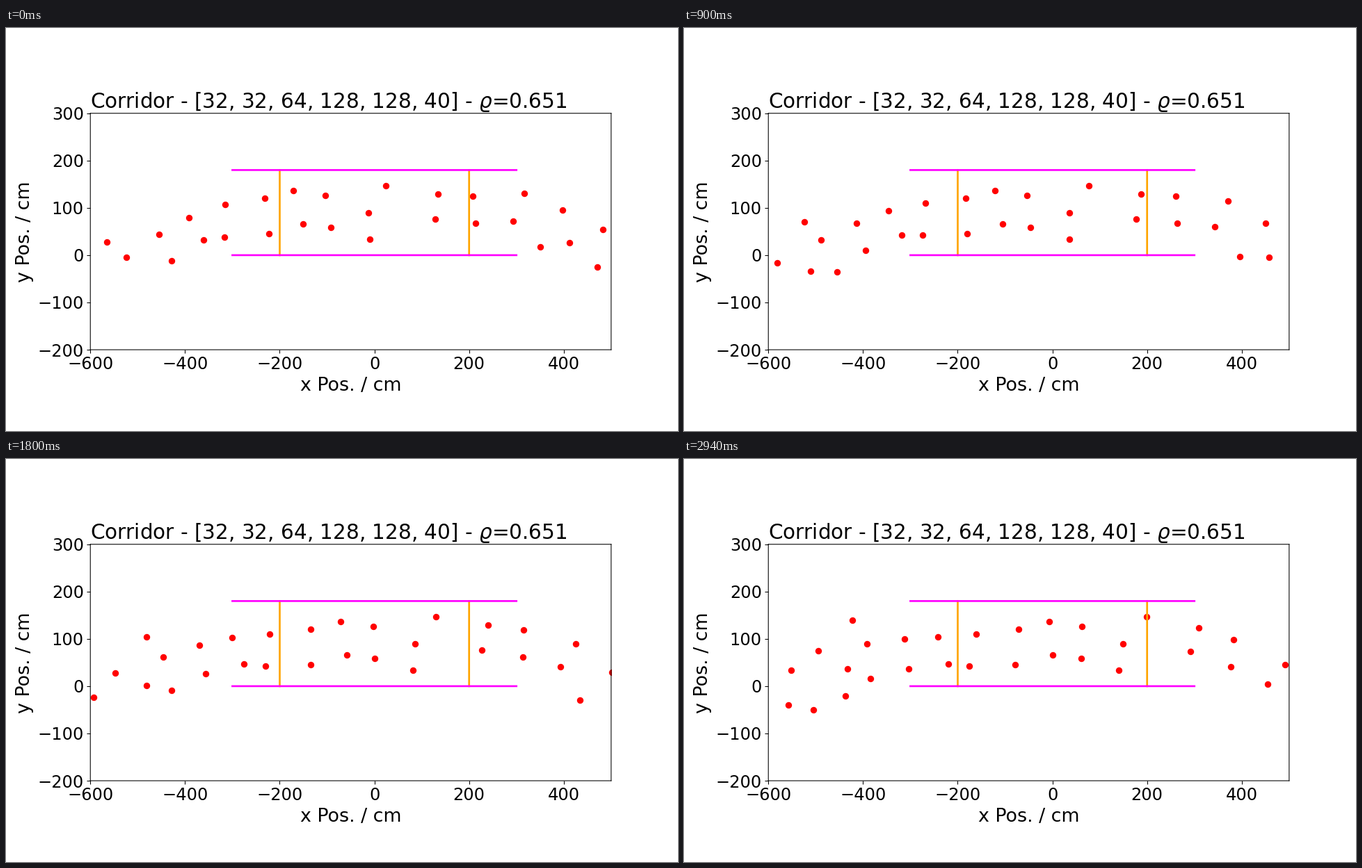
Write a matplotlib script that moves like this. It is 966 px wide and 580 px high and loops after 3 s.

```python
import matplotlib.pyplot as plt
import numpy as np
from matplotlib.animation import FuncAnimation

FRAMES, INTERVAL = 50, 60
MID = 26       # moment at which the crowd is placed
SCALE = 0.966  # text and line scale

plt.rcParams.update({
    "font.family": "DejaVu Sans",
    "path.snap": False,
    "axes.linewidth": 0.8 * SCALE,
    "axes.labelsize": 20 * SCALE,
    "axes.titlesize": 22 * SCALE,
    "axes.titlepad": 6 * SCALE,
    "axes.labelpad": 4 * SCALE,
})
for axis in ("xtick", "ytick"):
    plt.rcParams[axis + ".labelsize"] = 18 * SCALE
    plt.rcParams[axis + ".major.size"] = 3.5 * SCALE
    plt.rcParams[axis + ".major.pad"] = 3.5 * SCALE
    plt.rcParams[axis + ".major.width"] = 0.8 * SCALE

# pedestrians (x, y in cm) at mid-loop, from left to right
crowd = np.array([
    (-600, -37), (-577, -109), (-557, 16), (-523, -106), (-493, 96),
    (-490, -8), (-472, -63), (-458, 54), (-436, -16), (-381, 82),
    (-367, 22), (-313, 101), (-287, 46), (-242, 42), (-234, 110),
    (-147, 120), (-147, 45), (-85, 136), (-71, 66), (-16, 126),
    (-12, 59), (69, 33), (72, 90), (116, 147), (214, 76),
    (226, 129), (300, 121), (300, 64), (380, 47), (411, 97),
    (424, -22), (486, -32), (488, 40), (518, -97), (564, -25),
], float)


def velocity(pos):
    """Flow in cm per frame: up into the corridor, level inside, down after it."""
    x, y = pos.T
    vx = 2.89 + 0.0007 * x + 0.004 * y - 0.014 * np.maximum(25 - y, 0)
    vy = np.maximum(-270 - x, 0) / 100 - np.maximum(x - 250, 0) / 90
    return np.column_stack([vx, vy])


def drift(pos, steps, sign):
    """Positions after each step, forwards or backwards in time."""
    track = []
    for _ in range(steps):
        half = pos + sign * velocity(pos) / 2
        pos = pos + sign * velocity(half)
        track.append(pos)
    return track


tracks = (drift(crowd, MID, -1)[::-1] + [crowd]
          + drift(crowd, FRAMES - 1 - MID, 1))

fig = plt.figure(figsize=(9.66, 5.8), dpi=100, facecolor="white")
ax = fig.add_subplot()
fig.subplots_adjust(left=0.1255, right=0.9005)
ax.set_aspect("equal")
ax.set(xlim=(-600, 500), ylim=(-200, 300),
       xticks=range(-600, 500, 200), yticks=range(-200, 301, 100),
       xlabel="x Pos. / cm", ylabel="y Pos. / cm")
ax.set_title(r"Corridor - [32, 32, 64, 128, 128, 40] - $\varrho$=0.651", loc="left")

for x in (-200, 200):
    ax.plot([x, x], [0, 180], color="orange", lw=2 * SCALE)
for y in (0, 180):
    ax.plot([-300, 300], [y, y], color="magenta", lw=2 * SCALE)
dots = ax.scatter([], [], s=36 * SCALE ** 2, color="red", lw=SCALE, zorder=1)


def update(n):
    x, y = tracks[n].T
    present = (y > -54) & (x - y < 520)
    dots.set_offsets(tracks[n][present])
    return (dots,)


anim = FuncAnimation(fig, update, frames=FRAMES, interval=INTERVAL,
                     init_func=lambda: update(0), repeat=True, repeat_delay=0)
plt.show()
```
